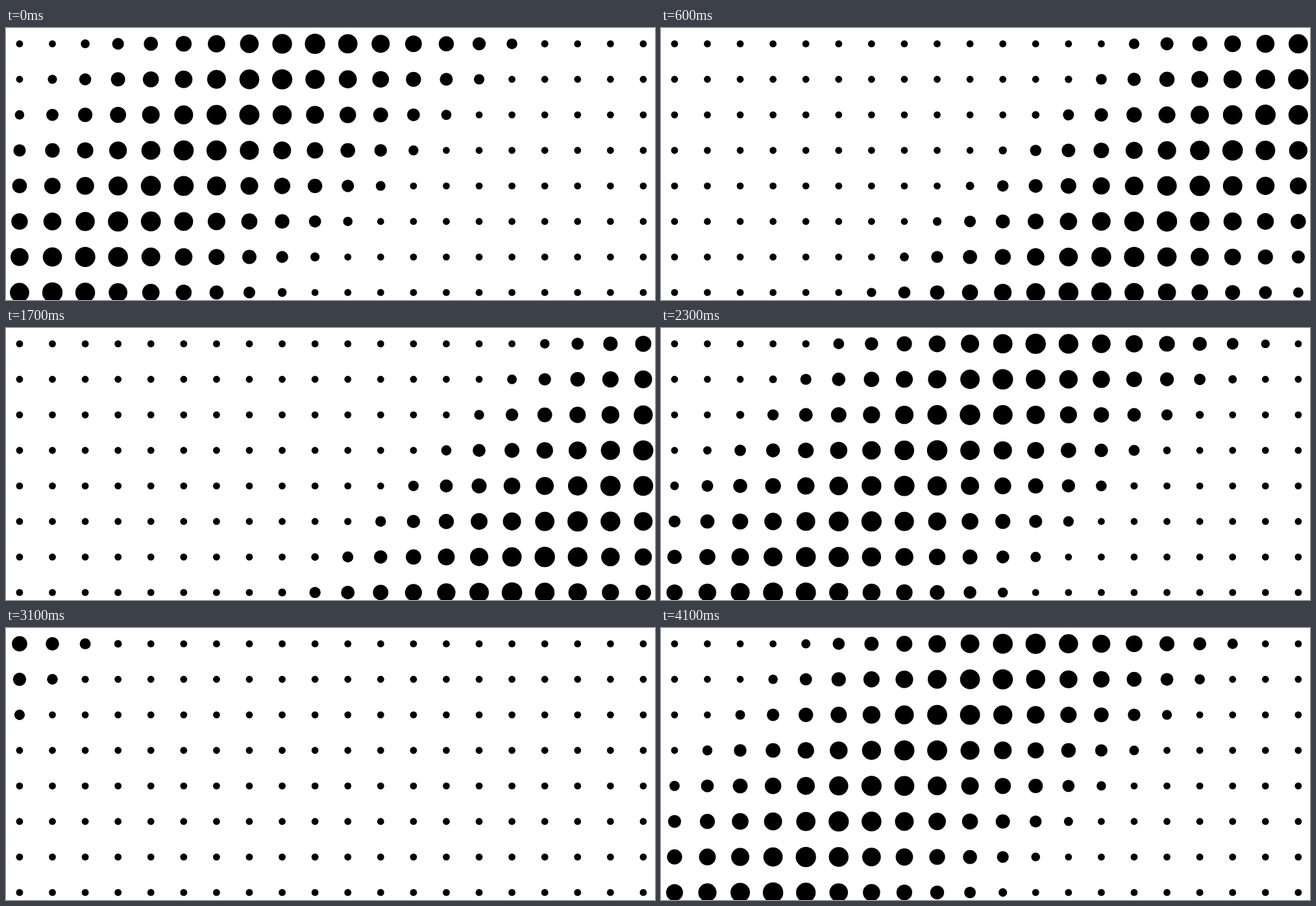
Write an HTML page with a canvas that moves like this. It is 1000 px wide and 420 px high and loops after 4.2 s.

```html
<!DOCTYPE html>
<html lang="en">
<head>
<meta charset="utf-8">
<title>Halftone wave</title>
<style>
  html, body { margin: 0; width: 100%; height: 100%; overflow: hidden; background: #fff; }
  canvas { display: block; width: 1000px; height: 420px; }
</style>
</head>
<body>
<canvas id="stage" width="1000" height="420"></canvas>
<script>
  const ctx = document.getElementById("stage").getContext("2d");
  const COLS = 20, ROWS = 8;
  const LOOP = 4200, STEP = 100;      // the picture advances every STEP ms
  const TURN = 1212, HALF = 2000;     // the band turns back at TURN, then every HALF ms
  const FAR = 1661, SPEED = 0.966;    // furthest band position, px per ms
  const MIN_AREA = 10.8 ** 2;

  // Position of the diagonal band, measured along x + y
  function bandAt(t) {
    const phase = Math.abs(t - TURN) % (2 * HALF);
    return FAR - SPEED * Math.min(phase, 2 * HALF - phase);
  }

  // Dot area falls off with the distance from the band
  function radius(d) {
    return Math.sqrt(Math.max(MIN_AREA, 1000 - 1.75 * d - 0.0018 * d * d)) / 2;
  }

  function draw(t) {
    const band = bandAt(t);
    ctx.fillStyle = "#fff";
    ctx.fillRect(0, 0, 1000, 420);
    ctx.fillStyle = "#000";
    for (let row = 0; row < ROWS; row++) {
      for (let col = 0; col < COLS; col++) {
        const x = 20.9 + 50.58 * col;
        const y = 24.4 + 54.86 * row;
        ctx.beginPath();
        ctx.arc(x, y, radius(Math.abs(x + y - band)), 0, 2 * Math.PI);
        ctx.fill();
      }
    }
  }

  const start = performance.now();
  function tick() {
    const t = (performance.now() - start) % LOOP;
    draw(Math.floor(t / STEP) * STEP);
    requestAnimationFrame(tick);
  }
  tick();
</script>
</body>
</html>
```
